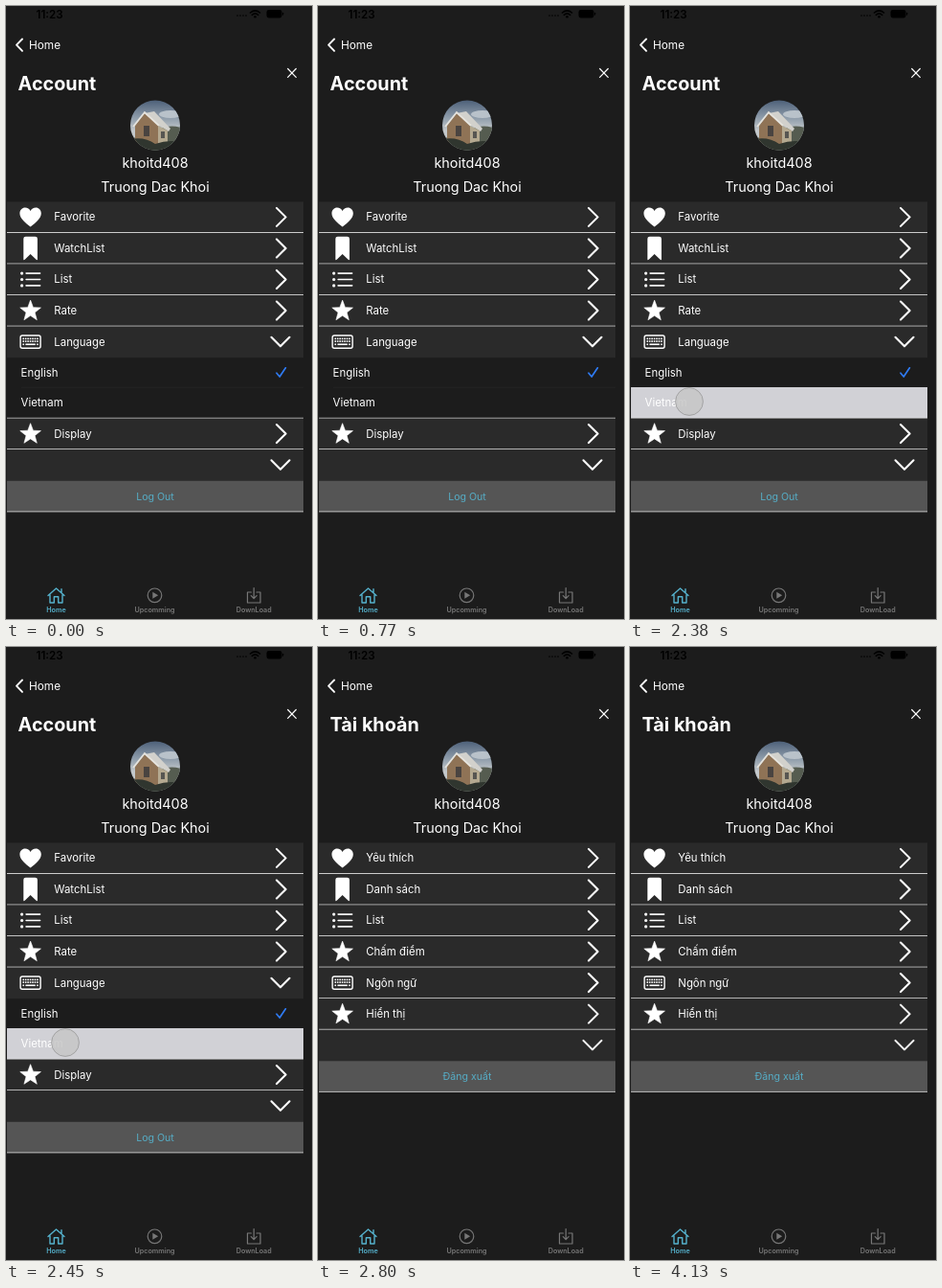
Write an HTML page that moves like this. It is 320 px wide and 640 px high and loops after 4690 ms.

```html
<!DOCTYPE html>
<html lang="en">
<head>
<meta charset="utf-8">
<style>
html, body { margin: 0; width: 100%; height: 100%; overflow: hidden; background: #1c1c1c; }
svg { display: block; width: 100vw; height: 100vh; font-family: Inter, "Open Sans", sans-serif; }
.line { fill: none; stroke: #fff; stroke-linecap: round; stroke-linejoin: round; }
.mid { text-anchor: middle; }
</style>
</head>
<body>
<svg id="stage" viewBox="0 0 320 640"></svg>
<script>
const LOOP = 4690, STEP = 70, TOUCH = 2240, PRESS = 2380, SWITCH = 2520, SETTLED = 2800;
const ROW = 32.55, TOP = 204.4;

const text = (x, y, size, s, extra = 'fill="#fff"') =>
  `<text x="${x}" y="${y}" font-size="${size}" ${extra}>${s}</text>`;
const line = (d, w, extra = '') => `<path class="line" d="${d}" stroke-width="${w}" ${extra}/>`;
const rect = (x, y, w, h, fill) => `<rect x="${x}" y="${y}" width="${w}" height="${h}" fill="${fill}"/>`;

function star() {
  const pts = Array.from({ length: 10 }, (_, i) => {
    const r = i % 2 ? 4.8 : 11.4, a = (i / 5 - .5) * Math.PI;
    return [(r * Math.cos(a)).toFixed(2), (.5 + r * Math.sin(a)).toFixed(2)];
  });
  return `<polygon points="${pts.join(' ')}" fill="#fff" stroke="#fff" stroke-width=".6" stroke-linejoin="round"/>`;
}

function keyboard() {
  let s = '<rect class="line" x="-10.5" y="-6.6" width="21" height="13.2" rx="2" stroke-width="1.4"/>';
  for (let y = 0; y < 2; y++)
    for (let x = 0; x < 7; x++) s += rect(-8.2 + x * 2.45, -4 + y * 2.7, 1.6, 1.6, '#fff');
  return s + rect(-8.2, 1.9, 1.6, 1.6, '#fff') + rect(-5.2, 1.9, 10.4, 1.6, '#fff') + rect(6.5, 1.9, 1.6, 1.6, '#fff');
}

// Icons are centred on the origin
const icons = {
  heart: '<path d="M0 10C-5 6-11.2 1.5-11.2-4C-11.2-7.6-8.6-10-5.6-10C-3-10-1-8.6 0-6.4C1-8.6 3-10 5.6-10C8.6-10 11.2-7.6 11.2-4C11.2 1.5 5 6 0 10Z" fill="#fff"/>',
  mark: '<path d="M-7.3 11.5V-10Q-7.3-12.2-5-12.2H5Q7.3-12.2 7.3-10V11.5Q7.3 12.8 6 11.8L0 6L-6 11.8Q-7.3 12.8-7.3 11.5Z" fill="#fff"/>',
  list: [-6.4, 0, 6.4].map(y =>
    `<circle cx="-9" cy="${y}" r="1.6" fill="#fff"/>` + line(`M-4.5 ${y}H10`, 1.6)).join(''),
  star: star(),
  keys: keyboard()
};

function menuRow(y, label, icon, open, rule = true) {
  const c = y + ROW / 2 - .3;
  const arrow = open ? `M277.5 ${c - 4.8}L287 ${c + 4.7}L296.5 ${c - 4.8}` : `M283 ${c - 9.5}L292.6 ${c}L283 ${c + 9.5}`;
  return rect(1, y, 310, ROW, '#2a2a2a') +
    (icon ? `<g transform="translate(25.6 ${c})">${icons[icon]}</g>` : '') +
    text(50.3, c + 4, 11.4, label) + line(arrow, 2.1) +
    (rule ? rect(1, y + ROW - .9, 310, 1, '#dedede') : '');
}

function logout(y, label, id) {
  return rect(1, y, 310, ROW, '#555') + rect(1, y + ROW - .9, 310, 1, '#b8b8b8') +
    text(156, y + 20, 10.6, label, `id="${id}" class="mid" fill="#56adc6"`);
}

function page(id, title, rows, open, exit) {
  let y = TOP, s = text(12.6, 88, 19.8, title, 'fill="#fff" font-weight="700"');
  rows.forEach(([label, icon]) => {
    const expanded = open && icon === 'keys';
    s += menuRow(y, label, icon, expanded || !icon, icon && !expanded);
    y += ROW;
    if (expanded) {
      s += rect(16, 397.8, 295, .6, '#292929') +
        `<rect id="pressed" x="1" y="398" width="310" height="32.3" fill="#d1d1d6"/>` +
        text(15.6, 386.7, 11.4, 'English') + text(15.6, 418.3, 11.4, 'Vietnam') +
        line('M283 383.2L286.2 387L292.4 377.8', 1.7, 'style="stroke:#2f7bf5"') +
        rect(1, 429.8, 310, 1, '#dedede');
      y = 430.6;
    }
  });
  return `<g id="${id}">${s}${logout(y, exit, id + 'Exit')}</g>`;
}

const statusBar = text(31.5, 12.6, 11.6, '11:23', 'fill="#000" font-weight="600"') +
  [242, 245, 248, 251].map(x => `<circle cx="${x}" cy="10" r=".8" fill="#000"/>`).join('') +
  line('M255.5 7Q260.5 2.8 265.5 7M257.3 9.3Q260.5 6.6 263.7 9.3', 1.6, 'style="stroke:#000"') +
  '<circle cx="260.5" cy="11.3" r="1.3"/><rect x="272.5" y="4" width="16" height="8.4" rx="2.4"/><rect x="289" y="6.7" width="1.2" height="3" rx=".6"/>';

const avatar = `<defs><clipPath id="round"><circle cx="156" cy="124.4" r="26"/></clipPath>
  <linearGradient id="sky" x2="0" y2="1"><stop stop-color="#4c5f78"/><stop offset=".35" stop-color="#8e9caa"/><stop offset=".6" stop-color="#c3c8cb"/></linearGradient></defs>
  <g clip-path="url(#round)">${rect(130, 98, 52, 53, 'url(#sky)')}
  <ellipse cx="172" cy="113" rx="12" ry="4" fill="#b9c2ca"/>
  <path d="M160 129Q171 123 183 127V151H130V139Z" fill="#555c50"/>
  <path d="M135 125L145 112L159 124V146L135 142Z" fill="#8f7356"/>
  <path d="M145 112L155 110L172 128L170 131L159 124Z" fill="#d2d1cc"/>
  <path d="M133 126L145 111L160 125" fill="none" stroke="#e5e3dd" stroke-width="1.8"/>
  <path d="M159 125L169 130V145H159Z" fill="#b4a990"/>
  ${rect(144, 125, 6, 11, '#4a4440')}${rect(162, 131, 4, 7, '#575652')}
  <path d="M130 139Q145 136 156 144Q170 139 182 142V152H130Z" fill="#30362f"/></g>`;

const tab = (x, label, color) =>
  text(x, 633, 7.2, label, `class="mid" font-weight="600" fill="${color}"`);
const gray = 'style="stroke:#777"', cyan = 'style="stroke:#55b1cc"';
const tabs = line('M44 615.5L52.5 608L61 615.5M46 614.5V623H50.3V616.8H54.7V623H59V614.5M58 612.5V608.8', 1.4, cyan) +
  '<circle class="line" cx="155.5" cy="615.3" r="7.3" stroke-width="1.2" style="stroke:#777"/><path d="M153.3 611.8L159.2 615.3L153.3 618.8Z" fill="#777"/>' +
  line('M256.5 612H252.5V623H266V612H262M259.2 607.5V618.5M256.3 615.7L259.2 618.6L262.1 615.7', 1.2, gray) +
  tab(52.5, 'Home', '#55b1cc') + tab(155.5, 'Upcomming', '#777') + tab(259.2, 'DownLoad', '#777');

const pageRows = labels => labels.map((label, i) =>
  [label, ['heart', 'mark', 'list', 'star', 'keys', 'star', ''][i]]);

stage.innerHTML = rect(0, 0, 320, 640, '#1c1c1c') + statusBar +
  line('M17 34.5L11 40.7L17 46.9', 1.9) + text(24, 45, 11.8, 'Home') +
  line('M294.7 65.5L303.3 74.3M303.3 65.5L294.7 74.3', 1.2) + avatar +
  text(156, 169.3, 14.4, 'khoitd408', 'class="mid" fill="#fff"') +
  text(156, 194.2, 14.4, 'Truong Dac Khoi', 'class="mid" fill="#fff"') +
  page('en', 'Account', pageRows(['Favorite', 'WatchList', 'List', 'Rate', 'Language', 'Display', '']), true, 'Log Out') +
  page('vi', 'Tài khoản', pageRows(['Yêu thích', 'Danh sách', 'List', 'Chấm điểm', 'Ngôn ngữ', 'Hiển thị', '']), false, 'Đăng xuất') +
  tabs +
  '<circle id="touch" cx="62" cy="413" r="14.4" fill="#c6c6c6" fill-opacity=".845" stroke="#999" stroke-width=".8"/>';

const $ = id => document.getElementById(id);
const show = (id, on) => $(id).setAttribute('visibility', on ? 'visible' : 'hidden');
const start = performance.now();

function draw(now) {
  const t = Math.floor(Math.max(0, now - start) % LOOP / STEP) * STEP;
  const switched = t >= SWITCH;
  $('en').style.display = switched ? 'none' : '';
  $('vi').style.display = switched ? '' : 'none';
  show('touch', t >= TOUCH && !switched);
  show('pressed', t >= PRESS && !switched);
  const fade = (t - SWITCH) / (SETTLED - SWITCH);
  $('viExit').setAttribute('opacity', Math.min(1, Math.max(0, fade)));
  requestAnimationFrame(draw);
}
draw(start);
</script>
</body>
</html>
```
